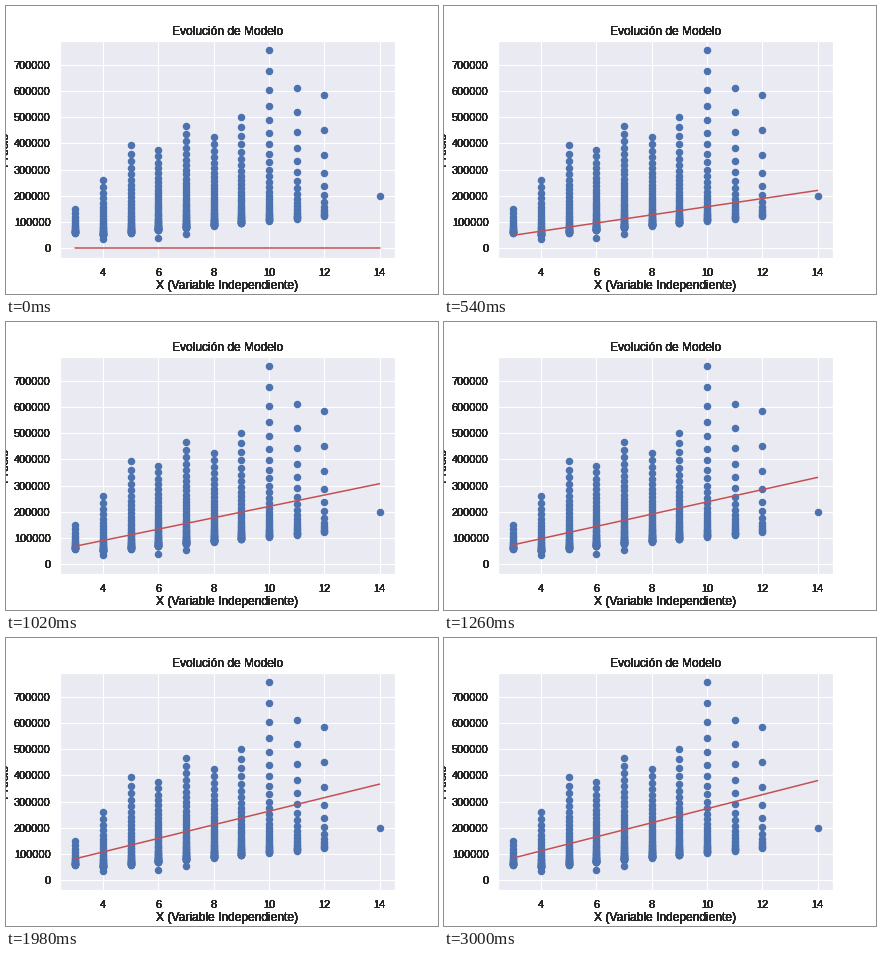
Animation of 432 by 288 pixels, one loop 3030 ms. Source, as a matplotlib script:

```python
import matplotlib.pyplot as plt
import numpy as np
from matplotlib.animation import FuncAnimation

STEPS, INTERVAL = 101, 30
BLUE, RED, PANEL, INK = "#4C72B0", "#C44E52", "#EAEAF2", ".15"
INK_COATS = 12  # overlaid label layers, gives the heavy lettering

# Gradient descent on y = w * (x + OFFSET), shrinking the error by DECAY a step
W_FIT, OFFSET, DECAY = 27105, 0.1447, 0.9536

# Highest price for 3, 4, ... 12 rooms and a few lone houses, in thousands
PEAKS = [150, 260, 393, 375, 466, 424, 501, 755, 612, 583]
STRAYS = [(4, 35), (6, 39), (7, 53), (14, 200)]

plt.rcParams.update({
    "font.family": "Liberation Sans", "font.size": 12,
    "axes.titlesize": 12, "axes.labelsize": 12, "axes.labelpad": 3,
    "xtick.labelsize": 11, "ytick.labelsize": 11,
    "text.color": INK, "axes.labelcolor": INK,
    "xtick.color": INK, "ytick.color": INK,
    "xtick.major.size": 6, "ytick.major.size": 6,
    "xtick.bottom": False, "ytick.left": False,
    "axes.linewidth": 1.25, "axes.edgecolor": "white",
    "axes.facecolor": PANEL, "axes.axisbelow": True,
    "grid.color": "white", "grid.linewidth": 1,
})


def prices(rooms, peak):
    """Crowded low prices thinning out exponentially towards the peak."""
    low = 50 + 9 * abs(rooms - 4)
    count = round(52 * np.exp(-(rooms - 7) ** 2 / 18))
    t = np.linspace(0, 1, count)
    return low + (peak - low) * np.expm1(4 * t) / np.expm1(4)


def houses():
    for rooms, peak in enumerate(PEAKS, start=3):
        for price in prices(rooms, peak):
            yield rooms, price * 1000
    for rooms, price in STRAYS:
        yield rooms, price * 1000


def add_labels(ax):
    ax.set(xlim=(2.45, 14.55), ylim=(-37750, 792750),
           xticks=range(4, 15, 2), yticks=range(0, 700001, 100000),
           title="Evolución de Modelo",
           xlabel="X (Variable Independiente)", ylabel="Precio")


fig, ax = plt.subplots(figsize=(6, 4), dpi=72, facecolor="white")
fig.subplots_adjust(left=0.125, right=0.9, bottom=0.125, top=0.88)
ax.grid(True)
ax.scatter(*zip(*houses()), s=36, color=BLUE, linewidths=1.5)
add_labels(ax)

for i in range(1, INK_COATS):
    add_labels(fig.add_axes(ax.get_position(), frameon=False, label=f"coat{i}"))

ends = np.array([3, 14])
line, = ax.plot(ends, 0 * ends, color=RED, lw=1.5, solid_capstyle="round")


def update(step):
    w = W_FIT * (1 - DECAY ** step)
    line.set_ydata(w * (ends + OFFSET))
    return line,


anim = FuncAnimation(fig, update, frames=STEPS, interval=INTERVAL,
                     repeat=True, repeat_delay=0)
plt.show()
```
